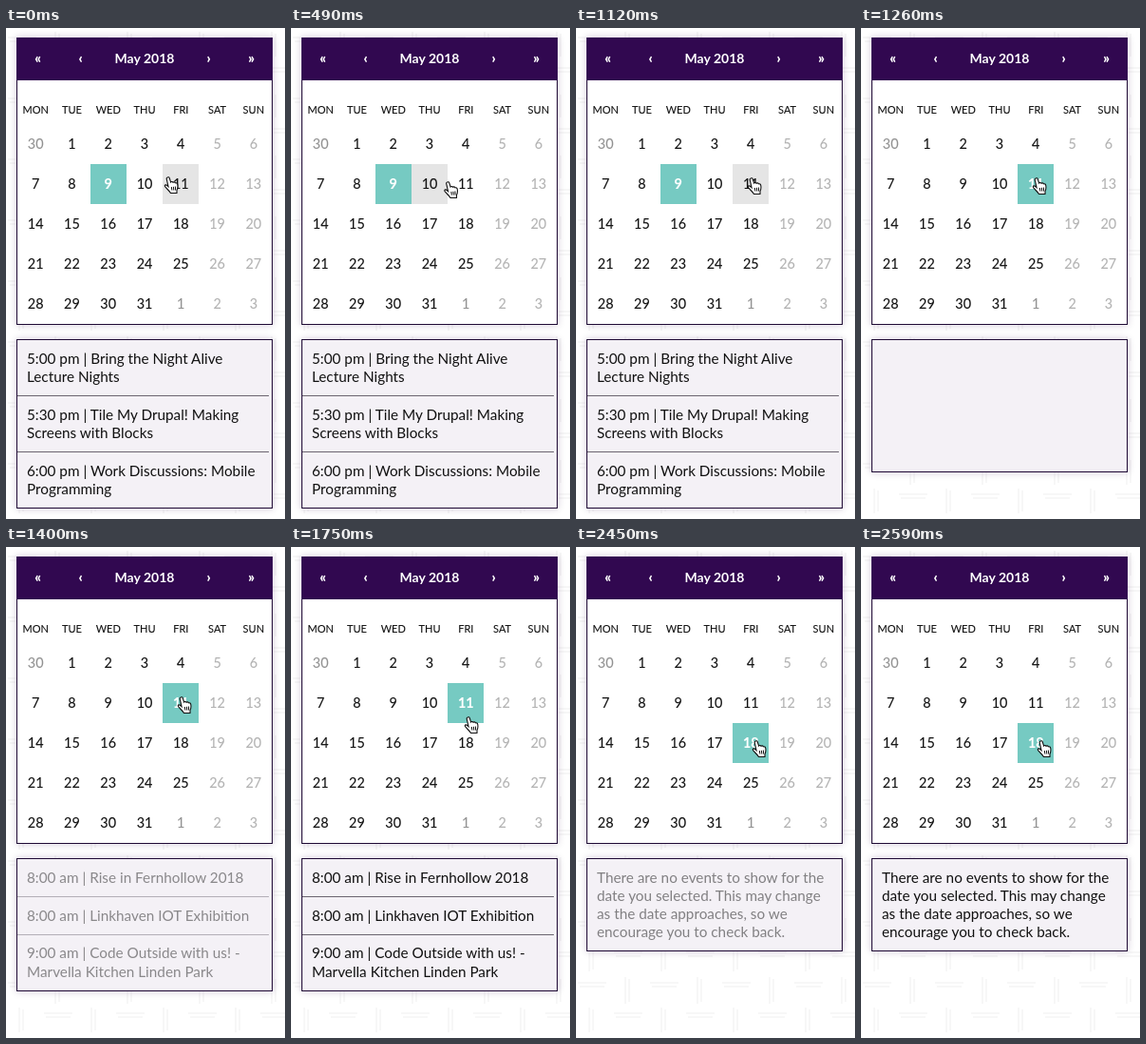
Write an HTML page that moves like this. It is 294x516 px and loops after 3220 ms.

```html
<!DOCTYPE html>
<html lang="en">
<head>
<meta charset="utf-8">
<style>
html, body { margin: 0; width: 100%; height: 100%; overflow: hidden; background: #fff; }
body { position: relative; font-family: Lato, "Open Sans", sans-serif; color: #111; }
svg { position: absolute; left: 0; top: 0; }
.box { position: absolute; left: 11px; width: 270px; box-sizing: border-box; border: 1px solid #1f0a35; box-shadow: 0 0 8px #31084f38; }
#cal { top: 10px; height: 302px; background: #fff; }
#nav { position: absolute; inset: -1px -1px auto; height: 45px; background: #310850; color: #fff; font: bold 14px/44px Lato, sans-serif; display: flex; text-align: center; }
#nav span { width: 45px; font-weight: 900; }
#nav b { flex: 1; }
#grid { position: absolute; top: 58px; left: 0; width: 268px; display: grid; grid-template-columns: repeat(7, 1fr); grid-template-rows: 32px repeat(5, 42px); text-align: center; font-size: 14.4px; line-height: 41px; -webkit-text-stroke: .1px; }
#grid i { font-style: normal; font-size: 11px; line-height: 33px; }
.out { color: #929292; }
.end { color: #b2b2b2; }
#grid .hover { background: #e5e5e5; }
#grid .on { background: #76cac2; color: #fff; font-weight: bold; }
#panel { top: 327px; background: #f4f1f6; font-size: 15.3px; line-height: 19.2px; }
#panel div { width: 255px; padding: 9.8px 0 9.8px 10px; white-space: nowrap; }
#panel div + div { border-top: 1px solid #6b6570; }
</style>
</head>
<body>
<svg width="294" height="516">
  <pattern id="weave" width="76" height="64" patternUnits="userSpaceOnUse">
    <path d="M2 10H32M4 14H30M40 42H70M42 46H68M52 4V32M56 6V30M14 36V62M18 38V60" fill="none" stroke="#f5f5f5" stroke-width="1.5"/>
  </pattern>
  <rect width="294" height="516" fill="url(#weave)"/>
</svg>
<div id="cal" class="box">
  <div id="nav"><span>«</span><span>‹</span><b>May 2018</b><span>›</span><span>»</span></div>
  <div id="grid"></div>
</div>
<div id="panel" class="box"></div>
<svg id="hand" width="18" height="20">
  <path d="M4.2 1C5 .4 6 .8 6.3 1.8L7.6 6C8.2 5.2 9.6 5.3 10 6.2 10.8 5.6 12 5.8 12.4 6.8 13.6 6.4 14.6 7.2 14.8 8.6 15.2 11 15 12.5 14 14.5V17.5H7.5C6.5 15.5 4 13.5 2 11.2 .8 10 1.4 8.6 2.6 8.9 3.6 9.2 4.4 10 5 10.6L3.3 3C3 2 3.4 1.3 4.2 1Z" fill="#fff" stroke="#111" stroke-width="1.1"/>
  <path d="M8.3 11L8.9 14.5M10.4 10.8L10.8 14.5M12.4 10.5L12.6 14.5" stroke="#111"/>
</svg>
<script>
const LOOP = 3220, STEP = 70;
const $ = id => document.getElementById(id);
const views = [
  { from: 0, day: 9, show: 0, fade: 0, items: [
    "5:00 pm | Bring the Night Alive<br>Lecture Nights",
    "5:30 pm | Tile My Drupal! Making<br>Screens with Blocks",
    "6:00 pm | Work Discussions: Mobile<br>Programming"] },
  { from: 1190, day: 11, show: 1260, fade: 300, items: [
    "8:00 am | Rise in Fernhollow 2018",
    "8:00 am | Linkhaven IOT Exhibition",
    "9:00 am | Code Outside with us! -<br>Marvella Kitchen Linden Park"] },
  { from: 2310, day: 18, show: 2310, fade: 280, items: [
    "There are no events to show for the<br>date you selected. This may change<br>as the date approaches, so we<br>encourage you to check back."] }
];
// Pointer tip: time, x, y
const track = [
  [0, 170, 156], [140, 150, 164], [280, 140, 168], [420, 152, 165], [490, 164.5, 161],
  [560, 180, 158], [700, 184, 157], [1610, 184, 157], [1750, 186, 178],
  [1890, 188, 195], [2030, 189, 203], [LOOP, 189, 203]
];

const cells = [];
for (const name of "MON TUE WED THU FRI SAT SUN".split(" "))
  $("grid").insertAdjacentHTML("beforeend", `<i>${name}</i>`);
for (let i = 0; i < 35; i++) {
  const cell = document.createElement("span");
  cell.textContent = i ? (i - 1) % 31 + 1 : 30;
  cell.base = i % 7 > 4 ? "end" : i < 1 || i > 31 ? "out" : "";
  cells.push(cell);
  $("grid").append(cell);
}

function tipAt(t) {
  const k = track.findIndex(p => p[0] > t);
  const [t0, x0, y0] = track[k - 1], [t1, x1, y1] = track[k];
  const u = (t - t0) / (t1 - t0);
  return [x0 + (x1 - x0) * u, y0 + (y1 - y0) * u];
}

let shown;
function draw(t) {
  const [x, y] = tipAt(t);
  $("hand").style.transform = `translate(${x - 4}px, ${y}px)`;
  const hover = Math.floor((y - 101) / 42) * 7 + Math.floor((x - 12) / 38.3);
  const day = views.findLast(v => t >= v.from).day;
  cells.forEach((c, i) => c.className = i === day ? "on" : i === hover ? "hover" : c.base);

  const view = views.findLast(v => t >= v.show);
  if (view !== shown) {
    $("panel").innerHTML = view.items.map(s => `<div>${s}</div>`).join("");
    shown = view;
  }
  const alpha = view.fade ? Math.min(1, (t - view.show) / view.fade) : 1;
  for (const item of $("panel").children) item.style.opacity = alpha;
}

const start = performance.now();
function tick() {
  const t = (performance.now() - start) % LOOP;
  draw(Math.floor(t / STEP) * STEP);
  requestAnimationFrame(tick);
}
tick();
</script>
</body>
</html>
```
